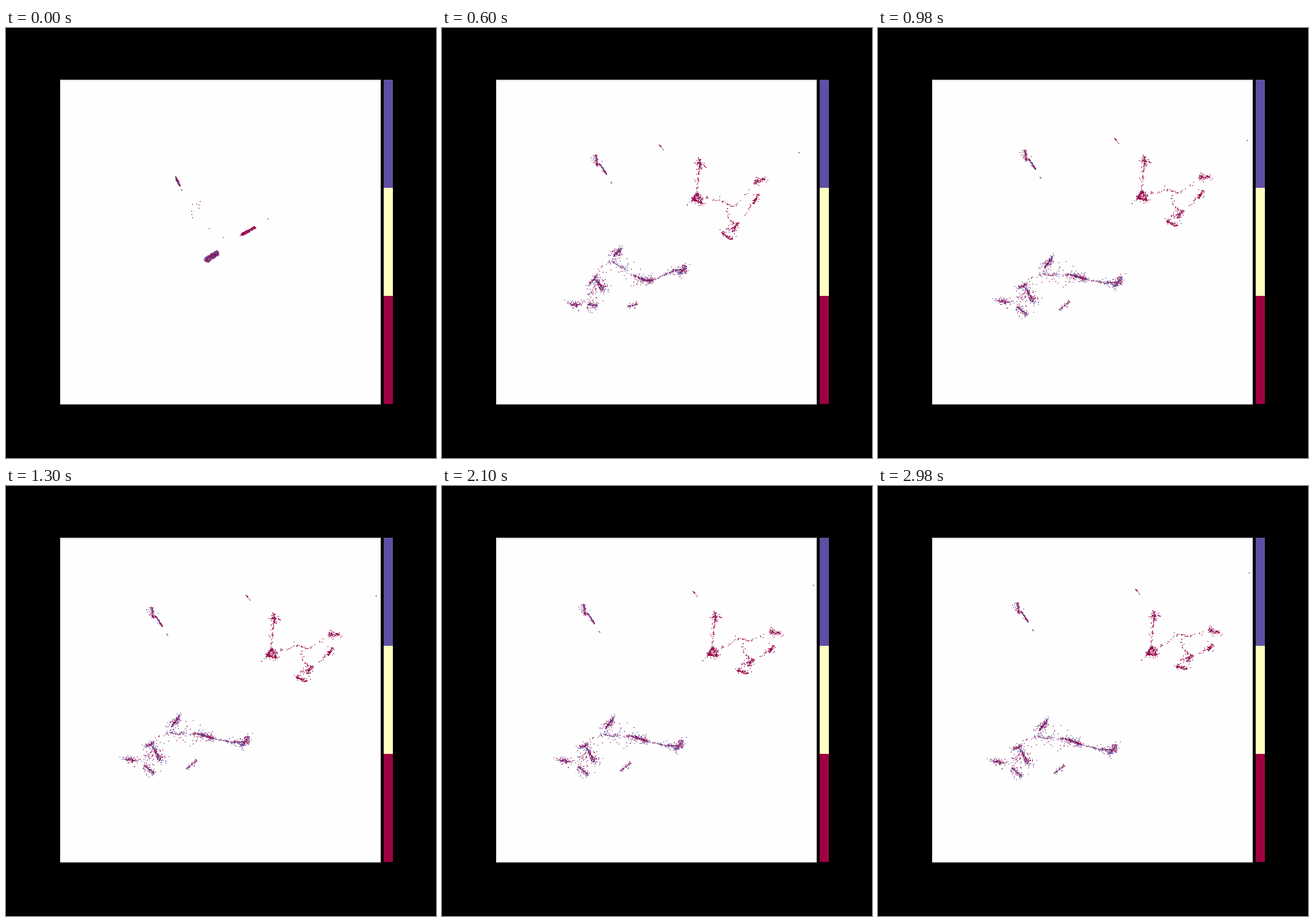
These frames come from a looping animation (748x748 px, 3030 ms). A matplotlib script:

```python
import matplotlib.pyplot as plt
import numpy as np
from matplotlib.animation import FuncAnimation
from matplotlib.patches import Rectangle

SIZE, DPI = 748, 64
TICK, FRAMES, STEPS = 10, 303, 150
OPEN, SETTLED, END = 600, 980, 2980
RED, YELLOW, BLUE = "#9e0142", "#ffffbf", "#5e4fa2"

rng = np.random.default_rng(12)


def strokes(density, width, *lines):
    """Random dots with a tight core and a loose halo around line segments."""
    clouds = []
    for x0, y0, x1, y1 in lines:
        n = 2 + int(density * np.hypot(x1 - x0, y1 - y0))
        spread = np.minimum(rng.exponential(1, (n, 1)), 2)
        noise = rng.normal(size=(n, 2)).clip(-2, 2) * spread * width
        clouds.append((x0, y0) + rng.random((n, 1)) * (x1 - x0, y1 - y0) + noise)
    return np.concatenate(clouds)


def openness(t):
    """Falls from 1 to 0 while the layout settles."""
    return np.interp(t, [600, 980, 1660, 2100, 2500, 2980],
                     [1, .52, .34, .16, .1, 0])


def upper_shift(x, y, t):
    return 25 * openness(t), 18 * openness(t)


def lower_shift(x, y, t):
    late = min((END - t) / (END - SETTLED), 1)
    sway = max((SETTLED - t) / (SETTLED - OPEN), 0)
    wave = np.cos(2 * np.pi * (x - 206) / 130)
    return (9 * late + sway * (12 - .06 * (x - 231)),
            -(x / 100) ** 2 * late + sway * (14 * wave - 8))


def right_shift(x, y, t):
    bulge = np.exp(-((x - 535) / 38) ** 2)
    return -32 * openness(t), (4 + 45 * bulge) * openness(t)


def dash_shift(x, y, t):
    return -70 * openness(t), 24 * openness(t)


def outlier_shift(x, y, t):
    return -25 * openness(t) ** 3, 66 * openness(t) ** .6


class Group:
    """Dots that burst out of one short line, then drift to their final place."""

    def __init__(self, dots, red, line, fuzz, shift, back):
        self.x, self.y = dots.T
        self.shift, self.back = shift, back
        head, tail = np.array(line, float).reshape(2, 2)
        along = dots @ (tail - head)
        u = (along - along.min()) / (np.ptp(along) + 1e-9)
        self.start = head + u[:, None] * (tail - head)
        self.start += rng.normal(size=dots.shape) * fuzz
        pick = rng.random(len(dots))
        self.colours = [YELLOW if p > .98 else RED if p < red else BLUE for p in pick]

    def pose(self, t):
        dx, dy = self.shift(self.x, self.y, max(t, OPEN))
        pos = np.column_stack([self.x + dx, self.y + dy])
        s = min(t / OPEN, 1) - 1
        if self.back:
            f = 1 + (self.back + 1) * s ** 3 + self.back * s ** 2
        else:
            f = 1 - (-s) ** 1.2
        return self.start + f * (pos - self.start)


upper = np.concatenate([
    strokes(4.5, 2.4, (243, 203, 244, 221)),
    strokes(3.5, .8, (250, 219, 261, 236)),
    strokes(.5, .5, (269, 250, 271, 252)),
])
lower = np.concatenate([
    strokes(4.6, 3, (295, 407, 280, 426), (324, 439, 354, 450), (236, 458, 250, 451),
            (248, 459, 262, 484), (199, 478, 218, 482), (233, 491, 250, 505),
            (390, 458, 412, 460), (415, 450, 404, 466)),
    strokes(2, 1.5, (307, 499, 325, 486), (295, 407, 280, 426), (326, 440, 354, 450)),
    strokes(1, .7, (354, 450, 392, 460)),
    strokes(1.7, 8, (272, 436, 325, 440), (232, 474, 270, 478)),
])
right = np.concatenate([
    strokes(4.5, 2.3, (476, 279, 468, 294), (468, 293, 484, 293), (484, 293, 476, 279),
            (480, 219, 481, 232), (519, 314, 538, 318), (537, 303, 548, 294),
            (576, 250, 594, 255), (575, 287, 582, 276)),
    strokes(.8, 1.5, (480, 232, 475, 272), (474, 225, 492, 226), (520, 258, 536, 259),
            (532, 284, 546, 297), (526, 302, 540, 298)),
    strokes(.35, 1.2, (488, 281, 522, 259), (528, 262, 530, 282),
            (538, 262, 575, 251), (552, 293, 575, 283)),
    strokes(1, .2, (459, 303, 459, 303)),
])
dash = strokes(.5, .5, (447, 178, 458, 192))
outlier = strokes(1, .3, (646, 151, 646, 151))

groups = [
    Group(upper, .48, (295, 259, 306, 282), .6, upper_shift, 2.5),
    Group(lower, .48, (348, 404, 368, 391), 1.8, lower_shift, 2.2),
    Group(right, .85, (409, 360, 433, 347), .9, right_shift, 1),
    Group(dash, .95, (315, 303, 378, 362), 8, dash_shift, 0),
    Group(outlier, .5, (455, 332, 455, 332), .4, outlier_shift, 0),
]


def layout(step):
    pos = np.concatenate([g.pose(step * 20) for g in groups])
    shake = np.random.default_rng(step).normal(size=pos.shape)
    return pos + .25 * (1 - step / STEPS) * shake


fig = plt.figure(figsize=(SIZE / DPI, SIZE / DPI), dpi=DPI, facecolor="black")
ax = fig.add_axes([0, 0, 1, 1])
ax.set(xlim=(0, SIZE), ylim=(SIZE, 0))
ax.axis("off")


def box(x, y, w, h, colour, **style):
    style = {"linewidth": 0, **style}
    return ax.add_patch(Rectangle((x, y), w, h, facecolor=colour, **style))


panel = box(94, 90, 558, 564, "#fefefe")
box(94.5, 90.5, 557, 563, "none", edgecolor="#cccccc", linewidth=72 / DPI)
for i, colour in enumerate((BLUE, YELLOW, RED)):
    box(657, 90 + 188 * i, 16, 188, colour)

dots = ax.scatter(*layout(0).T, s=3.2, linewidths=0,
                  c=[c for g in groups for c in g.colours])
dots.set_clip_path(panel)


def update(frame):
    dots.set_offsets(layout(min(frame // 2, STEPS - 1)))
    return (dots,)


anim = FuncAnimation(fig, update, frames=FRAMES, interval=TICK,
                     repeat=True, repeat_delay=0)
plt.show()
```
